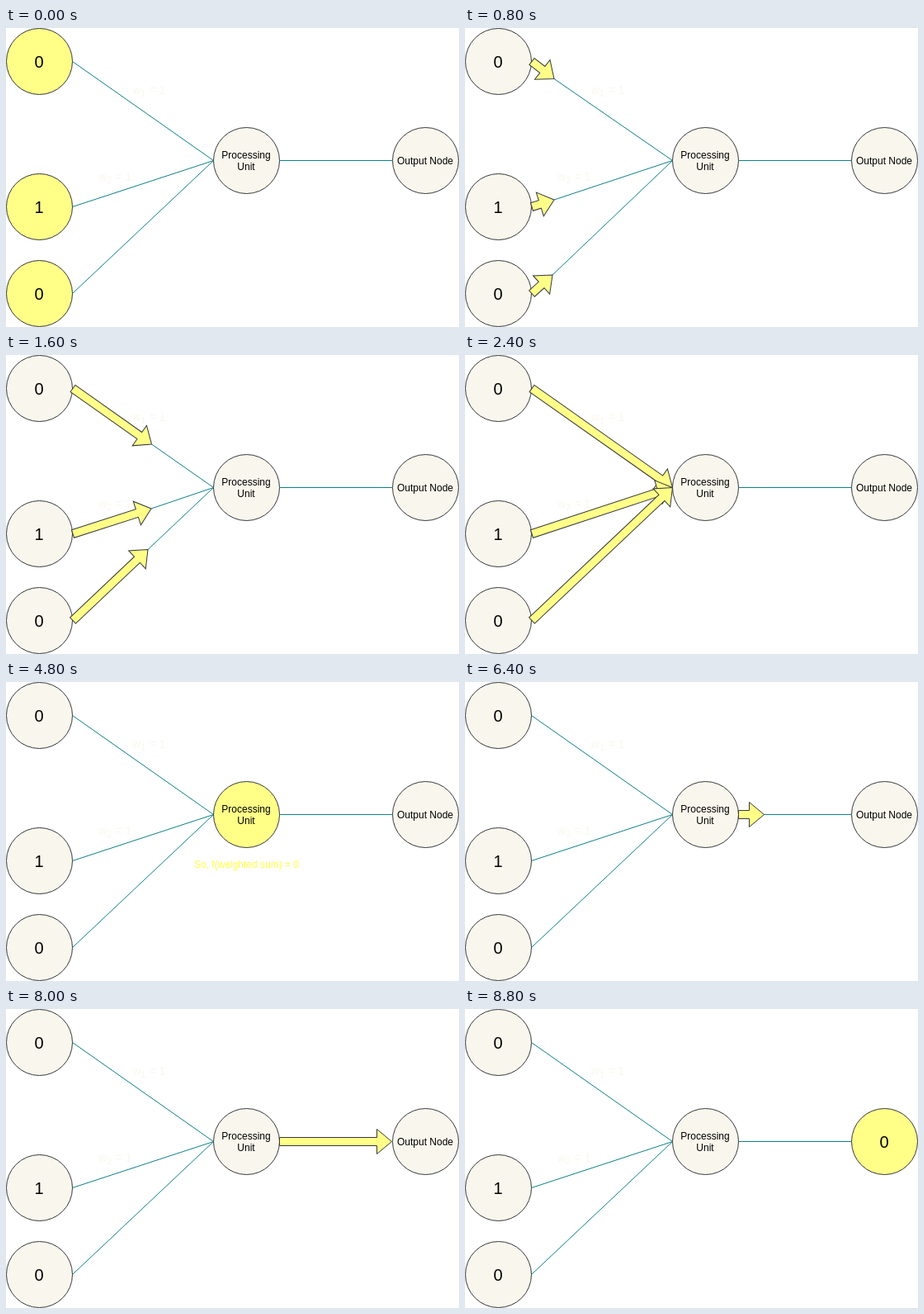
An HTML page with a canvas for the animation above (9.6 s loop, 549 by 362 pixels).

```html
<!DOCTYPE html>
<html lang="en">
<head>
<meta charset="utf-8">
<title>Processing unit</title>
<style>
  html, body { margin: 0; width: 100%; height: 100%; overflow: hidden; background: #fff; }
  canvas { display: block; }
</style>
</head>
<body>
<canvas id="stage" width="549" height="362"></canvas>
<script>
const ctx = document.getElementById('stage').getContext('2d');
const STEP = 800, STEPS = 12;
const CREAM = '#f9f7ed', YELLOW = '#ffff88', INK = '#36393d', TEAL = '#0e8088', NOTE = '#ffff44';
const FONT = '"Liberation Sans", Arial, Helvetica, sans-serif';

const inputs = [
  { y: 40.5, value: '0', tips: [[108, 61.5], [176.5, 108], [251.5, 160.5]] },
  { y: 216.5, value: '1', tips: [[108, 208], [176, 186], [251.5, 160.5]] },
  { y: 321.5, value: '0', tips: [[106, 299], [172, 235.5], [251.5, 160.5]] }
];
const hub = [251.5, 160.5];
const outTips = [362.5, 410.5, 467.5];

function text(str, x, y, size = 12, color = '#000', align = 'center') {
  ctx.font = size + 'px ' + FONT;
  ctx.fillStyle = color;
  ctx.textAlign = align;
  ctx.fillText(str, x, y);
}

function node(x, y, lit) {
  ctx.beginPath();
  ctx.arc(x, y, 40, 0, Math.PI * 2);
  ctx.fillStyle = lit ? YELLOW : CREAM;
  ctx.fill();
  ctx.strokeStyle = INK;
  ctx.stroke();
}

function line(from, to) {
  ctx.beginPath();
  ctx.moveTo(...from);
  ctx.lineTo(...to);
  ctx.strokeStyle = TEAL;
  ctx.stroke();
}

function arrow([x, y], [tx, ty]) {
  const len = Math.hypot(tx - x, ty - y), neck = len - 18;
  ctx.save();
  ctx.translate(x, y);
  ctx.rotate(Math.atan2(ty - y, tx - x));
  ctx.beginPath();
  ctx.moveTo(0, -5);
  ctx.lineTo(neck, -5);
  ctx.lineTo(neck, -15);
  ctx.lineTo(len, 0);
  ctx.lineTo(neck, 15);
  ctx.lineTo(neck, 5);
  ctx.lineTo(0, 5);
  ctx.closePath();
  ctx.fillStyle = YELLOW;
  ctx.fill();
  ctx.strokeStyle = INK;
  ctx.stroke();
  ctx.restore();
}

function weight(index, x, y) {
  text('w', x, y, 14, CREAM, 'left');
  text(index, x + 10.1, y + 3, 11.67, CREAM, 'left');
  text('= 1', x + 20.5, y, 14, CREAM, 'left');
}

function draw(step) {
  const inStage = step >= 1 && step <= 3 ? step - 1 : -1;
  const outStage = step >= 8 && step <= 10 ? step - 8 : -1;
  const summing = step === 4 || step === 5;
  const firing = step === 6 || step === 7;
  const done = step === 11;

  ctx.fillStyle = '#fff';
  ctx.fillRect(0, 0, 549, 362);
  ctx.lineWidth = 1;

  for (const { y, value, tips } of inputs) {
    const start = [80.5, y];
    if (inStage < 2) line(inStage < 0 ? start : tips[inStage], hub);
    node(40.5, y, step === 0);
    text(value, 40, y + 7, 20);
  }
  if (outStage < 2) line([outStage < 0 ? 331.5 : outTips[outStage], 160.5], [468.5, 160.5]);

  node(291.5, 160.5, summing || firing);
  text('Processing', 291, 158);
  text('Unit', 291, 172);

  node(508.5, 160.5, done);
  if (done) text('0', 508, 167.5, 20);
  else text('Output Node', 508, 165);

  if (inStage >= 0) {
    for (const { y, tips } of inputs) arrow([81, y], tips[inStage]);
  }
  if (outStage >= 0) arrow([331.5, 160.5], [outTips[outStage], 160.5]);

  weight('1', 153, 80);
  weight('2', 112, 185);

  if (summing) {
    ['weighted sum', '= 0 + 0*1 + 1*1', '= 1', '< 1.5 = threshold']
      .forEach((row, i) => text(row, 253, 224 + i * 14, 12, NOTE, 'left'));
  }
  if (firing) text('So, f(weighted sum) = 0', 291.5, 225, 12, NOTE);
}

const begin = performance.now();
function tick() {
  draw(Math.floor((performance.now() - begin) / STEP) % STEPS);
  requestAnimationFrame(tick);
}
tick();
</script>
</body>
</html>
```
